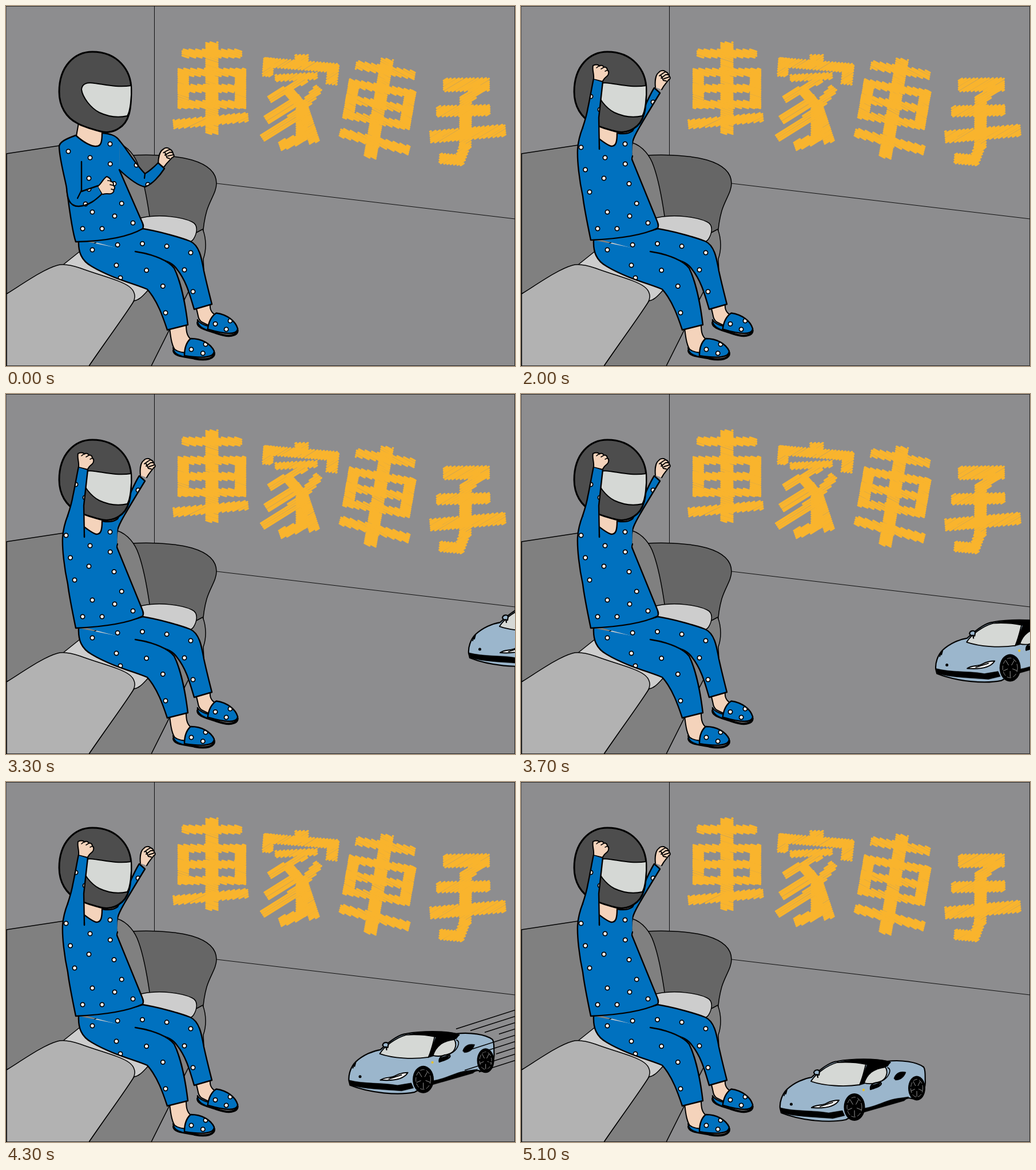
Recreate the animation shown at these times as an HTML page. Size 890 px wide and 629 px high, loop 5.2 s.

```html
<!DOCTYPE html>
<html lang="zh-Hant">
<head>
<meta charset="utf-8">
<title>車家車手</title>
<style>
  html, body { margin: 0; width: 100%; height: 100%; overflow: hidden; background: #8d8d8f; }
  svg { display: block; width: 100vw; height: 100vh; }
</style>
</head>
<body>
<svg id="stage" viewBox="0 0 890 629" stroke-linejoin="round" stroke-linecap="round"></svg>
<script>
const BLUE = '#0071bf', SKIN = '#f4d3bb', GLASS = '#d5d8d5', PAINT = '#9bb6cc', INK = '#000';
const LOOP = 5200;

const path = (d, fill = 'none', width = 2, stroke = INK) =>
  `<path d="${d}" fill="${fill}" stroke="${stroke}" stroke-width="${width}"/>`;
const blob = d => path(d, INK, 0.5);
const group = (body, attrs = '') => `<g ${attrs}>${body}</g>`;
const place = ([x, y, turn]) => `transform="translate(${x} ${y}) rotate(${turn})"`;

// Dots at even steps along a curve from one point to another.
function strand(count, [ax, ay, bx, by, cx = (ax + bx) / 2, cy = (ay + by) / 2]) {
  let out = '';
  for (let i = 0; i < count; i++) {
    const t = i / (count - 1), u = 1 - t;
    const x = u * u * ax + 2 * u * t * cx + t * t * bx, y = u * u * ay + 2 * u * t * cy + t * t * by;
    out += `<circle cx="${x}" cy="${y}" r="3.6" fill="#fff" stroke="#000" stroke-width="1.8"/>`;
  }
  return out;
}

// A dotted piece of cloth: the fill, dots cut at its edge, the outline on top.
let clips = 0;
function cloth(d, spots, width = 2.4) {
  const id = 'cloth' + clips++;
  return `<clipPath id="${id}"><path d="${d}"/></clipPath>` + path(d, BLUE, 0, 'none') +
    group(spots, `clip-path="url(#${id})"`) + path(d, 'none', width);
}

// Blend two paths that have the same commands, or two lists of numbers.
function mix(a, b, k) {
  const to = b.match(/-?[\d.]+/g);
  let i = 0;
  return a.replace(/-?[\d.]+/g, n => +n + (to[i++] - n) * k);
}
const mixList = (a, b, k) => a.map((v, i) => v + (b[i] - v) * k);

/* ---------- room ---------- */
function room() {
  return `<rect width="890" height="629" fill="#8d8d8f"/>` + path('M259.5,0V270M360,309L890,372', 'none', 0.9) +
    `<rect x=".4" y=".4" width="889.2" height="628.2" fill="none" stroke="#000" stroke-width=".8"/>`;
}

function sofa() {
  return path('M217,261C262,259 300,262 325,269C352,277 368,290 368,310C368,325 357,338 351,358C347,372 345,385 344,402L250,400Z', '#666', 1.5) +
    path('M344,390C351,408 350,428 345,442L346,463L319,499L254,629H145L224,515L250,440Z', '#808080', 1.5) +
    path('M1,258L100,243L195,239C213,245 226,262 232,280C242,308 247,340 251,367L200,440L100,452L1,503Z', '#808080', 1.5) +
    path('M100,452L130,428L237,370C270,363 308,369 325,377C338,383 333,399 328,407C322,416 300,420 290,425L247,498C238,508 232,514 224,515Z', '#cdcdcd', 1.5) +
    path('M1,503C30,485 65,460 90,453C100,450 115,453 130,458C165,471 200,479 215,490C225,497 228,508 222,518C205,545 170,592 145,629H1Z', '#b2b2b2', 1.5);
}

/* ---------- wall lettering ---------- */
let seed = 7;
const rnd = () => (seed = seed * 16807 % 2147483647) / 2147483647;

// A bar filled with crayon lines at one angle, each line cut at the bar's sides.
function hatch([x1, y1, x2, y2, w = 18], angle) {
  const axis = Math.atan2(y2 - y1, x2 - x1), len = Math.hypot(x2 - x1, y2 - y1);
  const a = angle * Math.PI / 180 - axis, dir = [Math.cos(a), Math.sin(a)], normal = [-dir[1], dir[0]];
  const half = [len / 2 - 1.5, w / 2 - 1.5], reach = Math.hypot(len, w) / 2;
  let d = '';
  for (let k = -reach; k < reach; k += 3.1 + rnd() * 0.7) {
    let from = -Infinity, to = Infinity;
    half.forEach((size, i) => {
      const mid = -k * normal[i] / dir[i], span = Math.abs(size / dir[i]);
      from = Math.max(from, mid - span);
      to = Math.min(to, mid + span);
    });
    if (from < to) d += 'ML'.replace(/./g, c => {
      const t = c === 'M' ? from : to;
      return c + [0, 1].map(i => (k * normal[i] + t * dir[i]).toFixed(1));
    });
  }
  return group(path(d, 'none', 3.5, '#f9b42d'), place([(x1 + x2) / 2, (y1 + y2) / 2, axis * 180 / Math.PI]));
}
const letter = (bars, angle) => bars.map(b => hatch(b, angle)).join('');

// 車 around its centre; the foot and the length of the stem vary
function cart(foot, stem, at) {
  const row = (y, half, w) => [-half, y, half, y, w];
  const bars = [row(-60, 53, 17), [0, -81, 0, stem, 23]]
    .concat([-27, 1, 29].map(y => row(y, 60, 16)), [-50, 50].map(x => [x, -34, x, 36, 20]));
  return group(letter(bars, 18) + hatch(foot, foot[1] > foot[3] ? -26 : 20), place(at));
}

function lettering() {
  const house = [
    [517, 84, 517, 106, 25], [450, 98, 582, 109], [460, 90, 457, 124, 20], [573, 102, 569, 138, 21],
    [470, 126, 545, 122, 14], [525, 126, 460, 164, 16], [490, 144, 520, 178], [517, 165, 517, 236, 21],
    [516, 160, 455, 200], [518, 184, 448, 232], [548, 142, 518, 178], [518, 174, 540, 240, 20], [520, 230, 478, 245, 20]];
  const hand = [
    [764, 138, 846, 137, 25], [832, 142, 798, 168, 20], [752, 184, 847, 182, 21],
    [804, 156, 803, 250, 22], [741, 229, 874, 217, 23], [804, 240, 790, 278, 20], [757, 266, 800, 270, 20]];
  return group(
    cart([-68, 64, 64, 51], 82, [360, 143, 0]) + letter(house, -32) +
    cart([-60, 61, 66, 71], 97, [653, 171, 10]) + letter(hand, -31),
    'role="img" aria-label="車家車手"');
}

/* ---------- rider: each pair holds the low and the raised pose ---------- */
const TORSO = [
  'M198,286L236,373C238,378 242,383 239,389C210,406 165,411 122,412C116,395 110,350 106,318C104,305 94,270 93,247C92,238 105,232 122,226C135,238 150,246 158,245C166,245 168,238 168,222C180,223 192,225 199,236',
  'M194,268L236,371C238,377 242,382 239,388C210,402 165,407 122,409C116,380 110,350 108,332C102,305 98,270 99,250C100,235 103,225 108,212C125,220 145,242 158,245C166,245 168,238 168,222C178,224 188,224 195,218'];
const FAR_ARM = [
  'M199,236C210,248 225,275 243,293C250,289 258,282 266,274L277,284C268,298 255,312 243,316C230,314 215,302 198,286',
  'M195,218C200,210 205,200 210,190C217,175 225,155 233,143L243,152C232,170 215,198 207,212C198,228 190,240 194,268'];
const NEAR_ARM = [
  'M106,318C107,335 110,350 127,350C145,349 158,338 168,328L161,314L132,324L132,272',
  'M108,212C112,200 115,190 117,178C121,160 124,140 127,127L143,132L136,195L137,250'];
const CREASES = ['M132,322L125,336M243,293L242,301', 'M137,245L137,250M195,262L194,266'];
const SIDE_DOTS = [[109, 254, 139, 346], [105, 247, 120, 325]];
const NEAR_DOTS = [[145, 320, 145, 372, 133, 346], [122, 158, 110, 230, 160, 168]];
const FAR_DOTS = [[228, 278, 248, 312], [231, 168, 225, 149]];
const NEAR_FIST = [[165, 322, 45], [135, 129, 0]];
const FAR_FIST = [[271, 278, 6], [240, 144, 0]];

function nearFist(at) {
  return group(path('M-8,-2C-7,-10 -11,-18 -9,-25C-4,-27 0,-27 2,-24C6,-27 9,-24 10,-22C14,-23 16,-20 16,-17C20,-15 18,-9 16,-7C12,-4 10,-2 8,2', SKIN) +
    path('M-3,-21C-1,-23 1,-24 2,-24M5,-19L10,-22M12,-15L16,-17', 'none', 1.6), place(at));
}
function farFist(at) {
  return group(path('M-5,-2C-6,-12 -5,-24 1,-28C4,-32 10,-32 13,-29C16,-28 18,-25 19,-22C22,-19 21,-16 18,-15C14,-9 10,-6 6,2', SKIN) +
    path('M2,-22L9,-27L13,-29M5,-18L13,-24L18,-24M5,-22L9,-14L14,-13M10,-17L19,-20', 'none', 1.9), place(at));
}

function helmet() {
  return path('M151,80C195,80 219,112 219,146C219,180 216,203 197,214C185,222 172,221 165,219C150,215 135,211 125,205C105,195 93,175 93,150C93,105 120,80 151,80Z', '#4d4d4d', 3) +
    path('M132,146C133,135 142,133 155,135C172,137 195,143 219,139C220,160 217,185 212,192C195,196 178,193 163,186C148,178 134,160 132,146Z', GLASS);
}

// lift: 0 has the fists at the chest, 1 has both arms in the air
function upperBody(lift) {
  const bend = pair => mix(...pair, lift), at = pair => mixList(...pair, lift);
  const chest = strand(5, [182, 241, 222, 379, 176, 311]) + strand(2, [147, 265, 145, 301]) +
    strand(2, [151, 360, 190, 367]) + strand(2, [134, 389, 168, 389]);
  return path('M127,204L123,227L150,250L168,246V214Z', SKIN) +
    farFist(at(FAR_FIST)) + cloth(bend(FAR_ARM), strand(2, at(FAR_DOTS))) +
    cloth(bend(TORSO), chest + strand(3, at(SIDE_DOTS))) + helmet() +
    cloth(bend(NEAR_ARM), strand(3, at(NEAR_DOTS))) +
    path(bend(CREASES), 'none', 2.2) + nearFist(at(NEAR_FIST));
}

function slipper(attrs = '') {
  return group(path('M293,602C294,612 312,612 330,616C350,620 365,616 364,606', 'none', 4) +
    path('M292,597C296,603 306,605 313,606L312,613C304,611 293,608 292,597Z', BLUE) +
    cloth('M312,611C312,596 317,586 323,581C342,581 358,590 364,603C364,614 345,616 312,611Z',
      strand(3, [324, 600, 349, 591, 352, 618])), attrs);
}

function legs() {
  return path('M332,527L357,521C356,530 360,537 367,540L354,558L342,552C334,546 337,538 332,527Z', SKIN) +
    slipper('transform="translate(42 -44) rotate(8 328 600)"') +
    path('M286,562L315,556C315,568 316,576 323,582L312,606L298,604C290,596 288,580 286,562Z', SKIN) +
    slipper() +
    cloth('M127,405C160,405 215,397 239,389C270,394 310,406 322,411C338,418 342,440 346,463C352,490 356,505 360,521L329,530C321,503 315,480 299,460C292,450 283,446 270,443',
      strand(5, [151, 426, 323, 431, 240, 402]) + strand(2, [312, 461, 327, 499])) +
    cloth('M226,429C260,434 285,446 294,458C304,478 313,515 318,557L282,566C275,545 265,515 247,495C230,487 185,476 150,455C132,445 126,430 127,409',
      strand(2, [151, 426, 200, 475]) + strand(4, [193, 453, 279, 536, 290, 452])) +
    path('M193,419', 'none');
}

/* ---------- car, drawn where it comes to rest ---------- */
function wheel(x, y, rx, ry) {
  let spokes = '';
  for (let i = 0; i < 5; i++) {
    const a = i * Math.PI * 0.4 + 0.3, c = Math.cos(a) * rx, s = Math.sin(a) * ry;
    spokes += `M${x + c * 0.25},${y + s * 0.25}L${x + c * 0.66},${y + s * 0.66}`;
  }
  return `<ellipse cx="${x}" cy="${y}" rx="${rx}" ry="${ry}"/>` +
    `<ellipse cx="${x}" cy="${y}" rx="${rx * 0.7}" ry="${ry * 0.72}" fill="none" stroke="#bbb" stroke-width=".7" stroke-dasharray="7 4"/>` +
    path(spokes, 'none', 0.8, '#bbb');
}

function car() {
  return path('M453,570C452,560 456,546 465,537C478,525 495,518 508,516C522,503 540,489 553,488C580,483 620,483 640,488C665,485 692,489 704,498C708,504 706,512 707,525C706,540 700,552 693,555L678,552L600,573L568,590C540,596 490,592 455,578Z', PAINT, 2.2) +
    blob('M548,492C575,482 630,483 646,489L641,497C622,498 609,510 601,527L591,530L605,494Z') +
    path('M507,523C515,510 535,495 553,490C570,489 588,490 603,493C600,505 597,518 592,529C565,533 530,531 507,523Z', GLASS, 1.8) +
    path('M600,526C605,510 616,501 637,498C642,505 640,517 631,522C620,527 608,528 600,526Z', GLASS, 1.8) +
    path('M637,498L646,490M641,499C650,502 642,518 630,523', 'none', 1.6) +
    blob('M652,518C655,507 665,505 673,507C671,514 665,521 655,521Z') +
    blob('M453,569C480,576 510,573 538,578L562,574L566,583L545,588C510,585 480,585 456,578Z') +
    blob('M600,570C625,566 640,554 664,552L678,550L670,557L600,577Z') +
    path('M508,569C516,563 528,566 535,561C543,557 550,556 556,556C550,566 535,571 508,569Z', '#fff') +
    path('M523,567L545,560M460,548C462,542 463,538 465,538L463,545', 'none', 1.8) +
    path('M519,516L518,511M512,508C513,502 521,502 522,506L521,512L514,511Z', PAINT, 2.2) +
    path('M611,537C610,528 618,524 629,525C633,530 622,534 611,537Z', PAINT, 2.2) +
    blob('M613,530L629,525L626,531L611,538Z') +
    `<circle cx="472.5" cy="563" r="2.5"/><circle cx="599" cy="538" r="2.2" fill="#e5c233"/>` +
    wheel(583, 568, 18.5, 24) + wheel(692, 535, 15, 21.5);
}

function speedLines() {
  let d = '';
  for (let i = 0; i < 9; i++) {
    const x = 641 + i * 25 % 80, y = 427 + i * 11 + (805 - x) * 0.32, run = 150 + i * 10;
    d += `M${x},${y}l${run},${-run * 0.32}`;
  }
  return path(d, 'none', 1.5);
}

/* ---------- scene ---------- */
const stage = document.getElementById('stage');
const LIFTS = [0, 0.5, 1];
stage.innerHTML = room() + lettering() + sofa() + legs() +
  LIFTS.map(k => group(upperBody(k), 'class="pose"')).join('') +
  group(car() + group(speedLines(), 'id="wind"'), 'id="car"');

const poses = [...stage.querySelectorAll('.pose')];
const carBox = document.getElementById('car'), wind = document.getElementById('wind');
const show = (node, on) => node.setAttribute('display', on ? 'inline' : 'none');

// Poses hold for a second each; the car rolls in at ten steps a second.
function draw(time) {
  const step = Math.floor(time % LOOP / 100);
  const left = Math.max(0, 50 - step);
  poses.forEach((p, i) => show(p, i === Math.min(2, Math.floor(step / 10))));
  show(carBox, step >= 30);
  show(wind, step < 51);
  carBox.setAttribute('transform', `translate(${left * 20.94} ${left * -6.88})`);
}

const start = performance.now();
function tick() {
  draw(performance.now() - start);
  requestAnimationFrame(tick);
}
tick();
</script>
</body>
</html>
```
